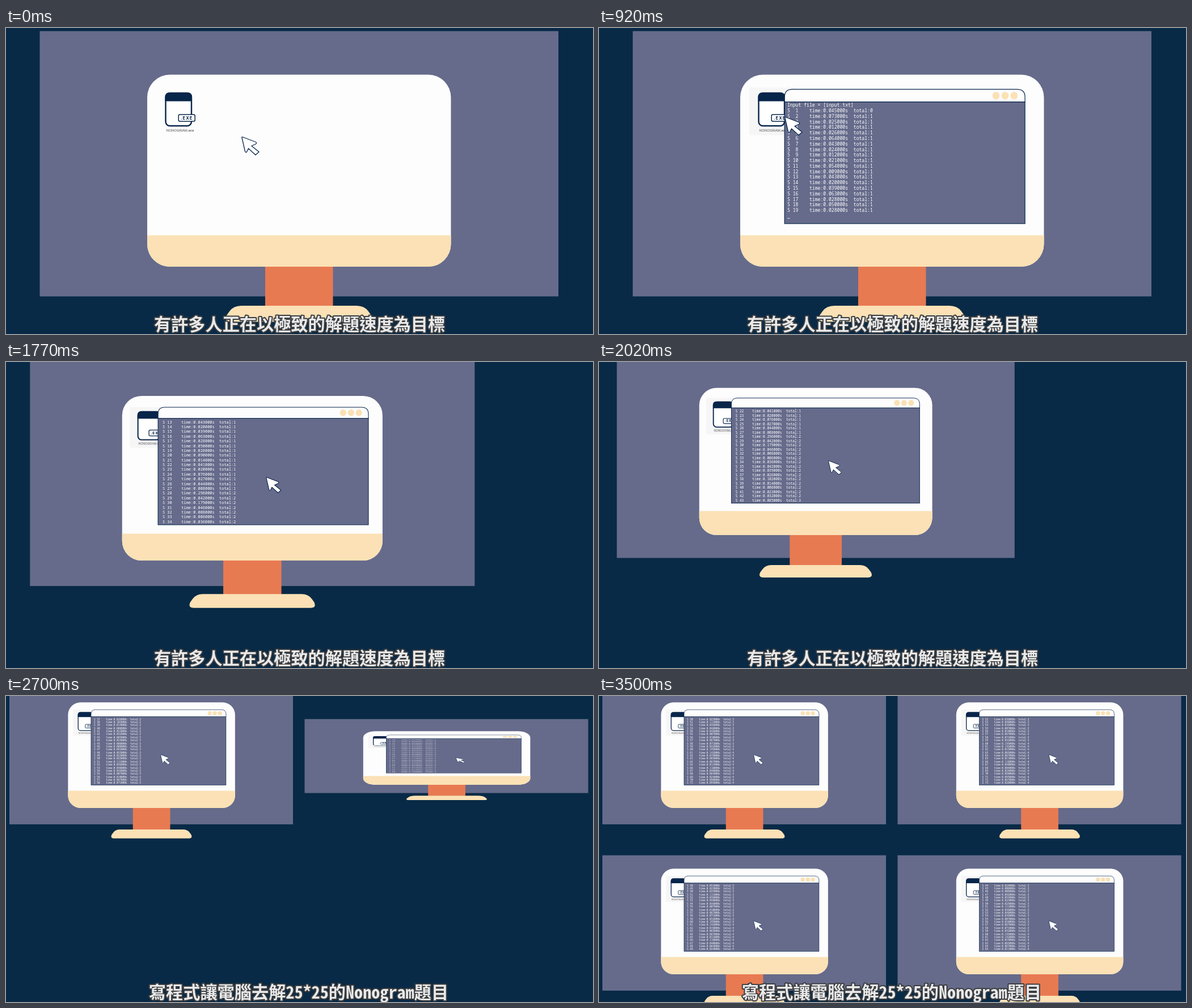
Recreate the animation shown at these times as an HTML page. Size 1035 px wide and 541 px high, loop 3.57 s.

```html
<!DOCTYPE html>
<html lang="zh-Hant">
<head>
<meta charset="utf-8">
<style>
html, body { margin: 0; width: 100%; height: 100%; overflow: hidden; background: #082a46; }
svg { display: block; width: 100%; height: 100%; }
.log { font: 8.12px "Noto Sans Mono", "DejaVu Sans Mono", monospace; fill: #fff; }
.tag { font: 700 7.6px Inter, sans-serif; letter-spacing: 1px; fill: #08254a; }
.label { font: 6.2px "Liberation Sans", sans-serif; fill: #eee; stroke: #888; stroke-width: .4px; text-anchor: middle; }
.sub { font: 700 30.2px "Noto Sans CJK TC", "Noto Sans CJK", sans-serif; text-anchor: middle;
  fill: #e9e9e9; stroke: #3b3d40; stroke-width: 4px; stroke-linejoin: round; paint-order: stroke; }
.half { font-feature-settings: "hwid"; }
</style>
</head>
<body>
<svg id="stage" viewBox="0 0 1035 541">
  <rect width="1035" height="541" fill="#082a46"/>
  <g id="units"></g>
  <text class="sub" id="sub1" x="517.5" y="534.5">有許多人正在以極致的解題速度為目標</text>
  <text class="sub" id="sub2" x="516" y="534.5">寫程式讓電腦去解<tspan class="half">25*25</tspan>的<tspan class="half">Nonogram</tspan>題目</text>
</svg>
<script>
const LOOP = 3570, ROWS = 22, PITCH = 9.78;
const NS = 'http://www.w3.org/2000/svg';
const byId = id => document.getElementById(id);
const clamp = v => Math.max(0, Math.min(1, v));
const smooth = p => p * p * (3 - 2 * p);
const span = (t, from, to) => clamp((t - from) / (to - from));
const ease = (t, from, to) => smooth(span(t, from, to));
const mix = (a, b, p) => a + (b - a) * p;

// solving times in ms
const times = ('45 73 25 12 26 64 43 24 12 21 54 9 43 20 39 63 28 50 28 90 14 41 20 76 27 44 8 296 42 179 ' +
  '46 8 6 36 42 39 26 102 14 8 23 32 85 24 8 8 92 53 23 25 111 36 48 36 7 10 67 71 32 195 ' +
  '142 19 65 67 11 118 40 84 24 90 95 67 28 41 33').split(' ').map(Number);
const totalAt = n => [2, 28, 43, 60].filter(k => n >= k).length;

function logLine(n) {
  const s = n === 0 ? 'Input file = [input.txt]'
    : `S ${String(n).padStart(2)}    time:${(times[n - 1] / 1000).toFixed(6)}s  total:${totalAt(n)}`;
  return s.replace(/ /g, '\u00a0');
}

// [time, lines printed]
const progress = [[780, 0], [920, 19.4], [1460, 23.4], [2020, 43.4], [2290, 50.4], [2700, 58.4], [3500, 71.4], [3570, 72.5]];
function printed(t) {
  if (t <= progress[0][0]) return 0;
  const i = progress.findIndex(k => k[0] >= t);
  const [t0, n0] = progress[i - 1], [t1, n1] = progress[i];
  return Math.floor(mix(n0, n1, (t - t0) / (t1 - t0)));
}

// [time, amount, speed per ms]
const zoomKeys = [[1080, 0, 0], [1460, .1082, .00056], [2020, .5165, .00083], [2290, .745, .00084], [2640, 1, .0003]];
function zoom(t) {
  if (t <= 1080) return 0;
  if (t >= 2640) return 1;
  const i = zoomKeys.findIndex(k => k[0] >= t);
  const [t0, a, va] = zoomKeys[i - 1], [t1, b, vb] = zoomKeys[i];
  const d = t1 - t0, p = (t - t0) / d, q = 1 - p;
  return a * q * q * (1 + 2 * p) + va * d * p * q * q + b * p * p * (3 - 2 * p) - vb * d * p * p * q;
}

const scene = top => `
  <rect class="panel" y="${top}" height="${474.5 - top}" fill="#666b8b"/>
  <rect x="457" y="420" width="119.5" height="73" fill="#e87a52"/>
  <path d="M415 491H618Q632 491 639 501L644 508Q649 519.5 637 519.5H396Q384 519.5 389 508L394 501Q401 491 415 491Z" fill="#fbe1b5"/>
  <rect x="249" y="82.5" width="535.5" height="339.5" rx="40" fill="#fdfdfd"/>
  <path d="M249 366.5H784.5V382A40 40 0 0 1 744.5 422H289A40 40 0 0 1 249 382Z" fill="#fbe1b5"/>
  <rect class="hover" x="265" y="105.5" width="80" height="84" fill="#f7f6f6"/>
  <rect x="281.5" y="115" width="45.5" height="58" rx="7.5" fill="#fff" stroke="#08254a" stroke-width="2.4"/>
  <path d="M280.5 129.5V122Q280.5 114 288.5 114H320Q328 114 328 122V129.5Z" fill="#08254a"/>
  <rect x="304.2" y="153" width="29" height="12" rx="2.5" fill="#fff" stroke="#08254a" stroke-width="1.5"/>
  <text class="tag" x="308" y="161.8">.EXE</text>
  <text class="label" x="307" y="183">NONOGRAM.exe</text>
  <g class="win">
    <path d="M327.3 131V122Q327.3 108.5 341 108.5H737Q751 108.5 751 122V131Z" fill="#fdfdfd" stroke="#08254a" stroke-width="1.2"/>
    <rect x="327.3" y="130.8" width="423.7" height="215" fill="#666b8b" stroke="#08254a" stroke-width="1.2"/>
    ${[700, 716, 731.7].map(x => `<circle cx="${x}" cy="119.6" r="6.5" fill="#fbe1b5"/>`).join('')}
  </g>
  <g class="log">${Array.from({ length: ROWS }, (_, i) => `<text x="332" y="${139.3 + i * PITCH}"></text>`).join('')}</g>
  <path class="cursor" d="M1 1Q0 -1 3 0L25 8.5Q28 10 25.5 12L18 15.5L31 26L25 31.5L12.5 20L9.5 26Q8 28 6.5 25Z"
    fill="#fff" stroke="#08254a" stroke-width="1.3" stroke-linejoin="round"/>`;

// dx, dy: place on the stage; skip: line offset; open: start of the unfold
const units = [
  { dx: 0, dy: 0, skip: 0, top: 5.5 },
  { dx: 520.5, dy: 0, skip: 2, top: 5.5, open: 2590 },
  { dx: 0, dy: 294, skip: -2, top: 39.5, open: 2850 },
  { dx: 520.5, dy: 294, skip: -6, top: 39.5, open: 3110 }
];
for (const u of units) {
  u.el = document.createElementNS(NS, 'g');
  u.el.innerHTML = scene(u.top);
  byId('units').append(u.el);
  for (const name of ['panel', 'hover', 'win', 'log', 'cursor']) u[name] = u.el.querySelector('.' + name);
  u.rows = [...u.log.children];
}

const show = (el, on) => el.setAttribute('visibility', on ? 'inherit' : 'hidden');

function fillLog(u, last) {
  if (u.last === last) return;
  u.last = last;
  const first = Math.max(0, last - ROWS + 1);
  u.rows.forEach((row, i) => {
    const n = first + i;
    row.textContent = n <= last ? logLine(n) : n === last + 1 ? '_' : '';
  });
}

function draw(t) {
  const z = zoom(t), scale = 1 - .45 * z;
  const tx = -27.6 * z, ty = -34.1 * z;
  const crop = z ** 4;
  const reach = ease(t, 30, 590), leave = ease(t, 1080, 1790);
  const cx = mix(mix(415, 327, reach), 545, leave);
  const cy = mix(mix(193, 158, reach), 251, leave);
  const pop = 1.021 * (1 - (1 - span(t, 630, 1030)) ** 3);
  const count = printed(t);

  for (const u of units) {
    const fold = u.open ? ease(t, u.open, u.open + 220) : 1;
    show(u.el, fold > 0);
    if (!fold) continue;
    u.el.setAttribute('transform',
      `translate(${tx + u.dx} ${ty + u.dy}) scale(${scale}) translate(0 270.5) scale(1 ${fold}) translate(0 -270.5)`);
    u.panel.setAttribute('x', 59.5 + 1.6 * crop);
    u.panel.setAttribute('width', 914.5 - 5.4 * crop);
    show(u.hover, t >= 590);
    show(u.win, pop > 0);
    u.win.setAttribute('transform', `translate(539 227) scale(${pop || 1}) translate(-539 -227)`);
    show(u.log, t >= progress[0][0]);
    u.cursor.setAttribute('transform', `translate(${cx} ${cy})`);
    fillLog(u, Math.max(0, count + u.skip));
  }
  show(byId('sub1'), t < 2630);
  show(byId('sub2'), t >= 2630);
}

const start = performance.now();
function tick() {
  draw((performance.now() - start) % LOOP);
  requestAnimationFrame(tick);
}
tick();
</script>
</body>
</html>
```
